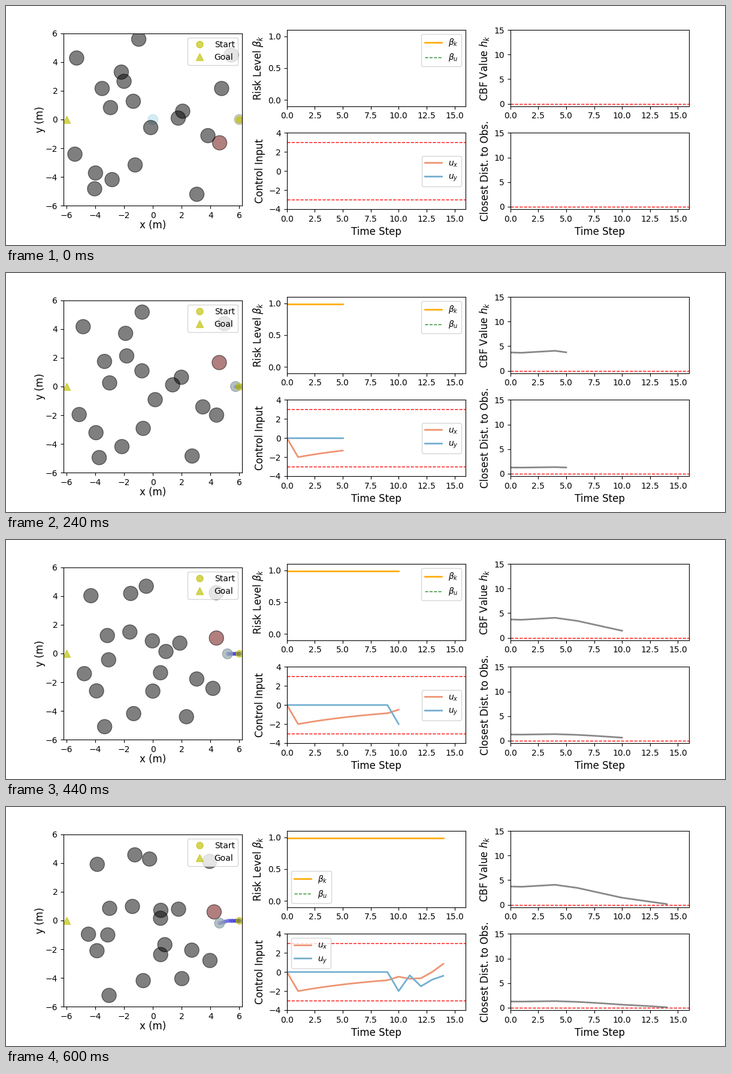
A matplotlib script for the animation above (640 ms loop, 1200 px wide and 400 px high).

```python
import numpy as np
import matplotlib.pyplot as plt
from matplotlib.animation import FuncAnimation
from matplotlib.patches import Circle

STEPS = 16
DT = 0.1
SAFE_DIST = 0.85

# Each obstacle: start point and total drift over the run, in metres.
OBSTACLES = np.array([
    (-5.29, 4.28, 1.43, -0.37), (-0.98, 5.59, 0.75, -1.31),
    (-2.19, 3.30, 0.94, 1.27), (-2.00, 2.66, 0.58, -1.68),
    (-3.52, 2.16, 0.52, -1.31), (-2.94, 0.83, -0.19, -1.83),
    (-1.36, 1.27, 1.91, -0.56), (1.76, 0.10, -1.23, 0.06),
    (2.07, 0.58, -0.29, 0.21), (4.77, 2.16, -0.52, -1.56),
    (5.44, 4.49, -1.50, -0.37), (-0.15, -0.56, 0.98, -1.12),
    (3.82, -1.12, -1.12, -0.94), (4.63, -1.62, -0.67, -1.16),
    (-5.41, -2.41, 0.94, 1.46), (-3.98, -3.72, 0.10, 1.62),
    (-4.04, -4.82, 1.00, -0.39), (-2.83, -4.18, 2.16, 0.00),
    (-1.23, -3.16, 1.77, 0.79), (3.05, -5.20, -1.04, 1.16),
])


def travelled(step):
    """Distance covered when the speed settles with a lag of two steps."""
    return step - 2 * (1 - np.exp(-step / 2))


def obstacle_positions(step):
    share = travelled(step) / travelled(STEPS - 1)
    return OBSTACLES[:, :2] + OBSTACLES[:, 2:] * share


def integrate(start, accel):
    """Position after each step for a double integrator."""
    moves = np.cumsum(np.cumsum(accel) * DT) * DT
    return start + np.concatenate([[0], moves])


# The robot brakes geometrically, then swerves during the last five steps.
time = np.arange(STEPS - 1)
u_x = -2 * 0.9 ** (time - 1.0)
u_x[0] = 0
u_x[10:] = [-0.49, -0.71, -0.65, 0, 0.86]
u_y = np.zeros(STEPS - 1)
u_y[10:] = [-2, -0.35, -1.5, -0.8, -0.4]
path = np.column_stack([integrate(6, u_x), integrate(0, u_y)])

beta = np.full(STEPS - 1, 0.987)
cbf = np.interp(time, [0, 1, 4, 6, 10, 14], [3.71, 3.65, 4.05, 3.42, 1.42, 0.14])
closest = np.sqrt(cbf + SAFE_DIST ** 2) - SAFE_DIST

plt.rcParams["font.family"] = "DejaVu Sans"
fig = plt.figure(figsize=(12, 4), dpi=100)
grid = fig.add_gridspec(2, 3, left=0.08, right=0.95, bottom=0.15, top=0.9,
                        wspace=0.25, hspace=0.35)

# Map of the robot and the moving obstacles
world = fig.add_subplot(grid[:, 0])
world.set(xlim=(-6.2, 6.2), ylim=(-6, 6), aspect="equal",
          xticks=range(-6, 7, 2), yticks=range(-6, 7, 2))
world.set_xlabel("x (m)", fontsize=12, labelpad=0)
world.set_ylabel("y (m)", fontsize=12, labelpad=0)
trail = [world.plot([], [], "o", color="mediumblue", ms=4, alpha=0.3, zorder=0.9)[0]
         for _ in range(STEPS)]
glow = world.add_patch(Circle((0, 0), 0.35, color="lightblue", alpha=0.5))
discs = [world.add_patch(Circle((0, 0), 0.5, ec="k", alpha=0.5)) for _ in OBSTACLES]
robot = world.add_patch(Circle((6, 0), 0.35, color="gray", alpha=0.4))
world.plot(6, 0, "yo", ms=8, alpha=0.65, label="Start")
world.plot(-6, 0, "y^", ms=8, alpha=0.65, label="Goal")
world.legend(loc="upper right")


def time_plot(row, col, label, ylim, yticks, limits=()):
    ax = fig.add_subplot(grid[row, col])
    ax.set(xlim=(0, 16), ylim=ylim, xticks=np.arange(0, 16, 2.5), yticks=yticks)
    ax.set_ylabel(label, fontsize=12)
    if row == 1:
        ax.set_xlabel("Time Step", fontsize=12)
    for y in limits:
        ax.axhline(y, color="r", ls="--", lw=1)
    return ax


risk = time_plot(0, 1, r"Risk Level $\beta_k$", (-0.1, 1.1), [0, 0.5, 1])
control = time_plot(1, 1, "Control Input", (-4, 4), range(-4, 5, 2), (3, -3))
barrier = time_plot(0, 2, r"CBF Value $h_k$", (-0.5, 15), range(0, 16, 5), (0,))
gap = time_plot(1, 2, "Closest Dist. to Obs.", (-0.5, 15), range(0, 16, 5), (0,))

curves = []
for ax, values, color, label in [
    (risk, beta, "#ffae12", r"$\beta_k$"),
    (control, u_x, "#ee9572", "$u_x$"),
    (control, u_y, "#74afd0", "$u_y$"),
    (barrier, cbf, "#888888", None),
    (gap, closest, "#888888", None),
]:
    curves.append((ax.plot([], [], color=color, lw=2, label=label)[0], values))
risk.plot([], [], "--", color="forestgreen", lw=1, label=r"$\beta_u$")
risk_legend = risk.legend(loc="upper right")
control_legend = control.legend(loc="center right")


def update(k):
    # The obstacle nearest to the robot one step ago is highlighted.
    before = max(k - 1, 0)
    offsets = obstacle_positions(before) - path[before]
    nearest = np.argmin(np.hypot(*offsets.T))
    for i, (disc, center) in enumerate(zip(discs, obstacle_positions(k))):
        disc.center = center
        disc.set_facecolor((0.4, 0, 0) if i == nearest else "k")

    robot.center = path[k]
    glow.center = path[k] if k else (0, 0)
    for i, dot in enumerate(trail):
        shown = path[i:i + 1] if 0 < i <= k else path[:0]
        dot.set_data(*shown.T)

    for line, values in curves:
        line.set_data(time[:k], values[:k])

    # Legends move out of the way of the growing curves.
    risk_legend.set_loc("upper right" if k < 14 else "lower left")
    control_legend.set_loc({14: "upper right", 15: "upper left"}.get(k, "center right"))


anim = FuncAnimation(fig, update, frames=STEPS, interval=40, repeat=True,
                     init_func=lambda: update(0))
plt.show()
```
